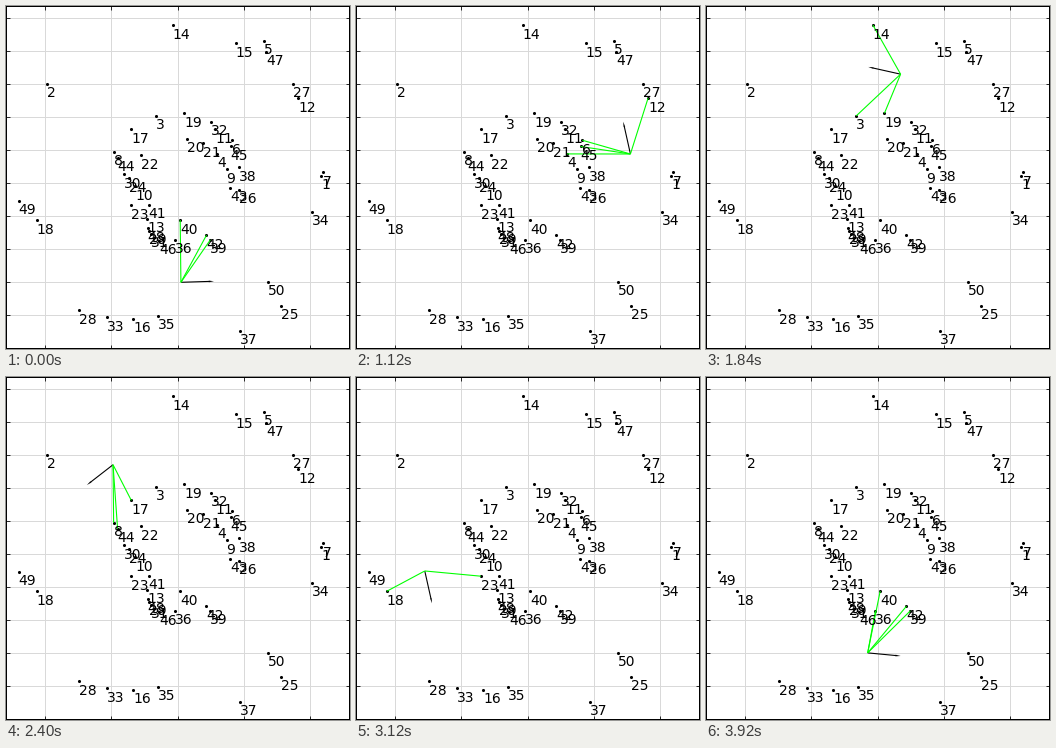
A matplotlib script that plays this animation: 344 by 343 pixels, repeating every 4 s.

```python
import numpy as np
import matplotlib.pyplot as plt
from matplotlib.animation import FuncAnimation
from matplotlib.collections import LineCollection

W, H, DPI = 344, 343, 64
FRAMES = 50
UNIT = 33.1                     # pixels per metre
ORIGIN = np.array([171.6, 177.05])
RADIUS = 10 / np.pi             # one lap is 20 m
SENSOR_RANGE = 2 * UNIT

# Landmarks spread evenly along spirals, inside and outside the driven circle:
# labels, first and last bearing (degrees), first and last distance (metres)
SPIRALS = [
    ("26 38 45 11", -6, 55, 1.87, 1.98),
    ("6 32 19 3 17 8", 38, 154, 2.1, 2.15),
    ("43 9 4 21 20", -5, 78, 1.59, 1.37),
    ("22 24 23 48 36 42", 143, 299, 1.4, 1.8),
    ("44 30 10", 157, 184, 1.97, 1.29),
    ("41 13 31", 217, 242, 1.1, 1.73),
    ("29 40", 239, 274, 1.68, 1.12),
    ("46 39", 252, 300, 1.83, 1.98),
    ("1 12 15", 3, 67.4, 4.34, 4.57),
    ("27 14 2", 40.8, 142.6, 4.6, 4.95),
    ("50 7 47", -47.4, 56, 4.05, 4.78),
    ("28 33 16 35", 232.3, 261.7, 4.85, 4.05),
    ("37 5", -67, 58.8, 4.85, 5.02),
    ("25 34", -50, -12, 4.84, 4.15),
    ("49 18", 186.3, 194.8, 4.83, 4.4),
]


def px(n):
    """Pixels to points."""
    return n * 72 / DPI


def to_stage(x, y):
    """Metres, y up, to stage pixels."""
    return ORIGIN + UNIT * np.column_stack([x, -y])


def spread(labels, bearing0, bearing1, dist0, dist1):
    """Evenly spaced landmarks on one spiral."""
    n = len(labels.split())
    bearing = np.radians(np.linspace(bearing0, bearing1, n))
    dist = np.linspace(dist0, dist1, n)
    return to_stage(dist * np.cos(bearing), dist * np.sin(bearing))


def pose(k):
    """Position in pixels and heading in radians."""
    heading = np.radians(1.8 + 360 / FRAMES * k)
    x = RADIUS * np.sin(heading)
    y = RADIUS * (1 - np.cos(heading)) - 3
    return to_stage(x, y)[0], heading


def visible(pos, heading):
    """Landmarks in range and in the half plane ahead."""
    offset = landmarks - pos
    ahead = offset @ np.array([np.cos(heading), -np.sin(heading)]) > 0
    return landmarks[ahead & (np.hypot(*offset.T) < SENSOR_RANGE)]


landmarks = np.vstack([spread(*spiral) for spiral in SPIRALS])
labels = " ".join(spiral[0] for spiral in SPIRALS).split()

fig = plt.figure(figsize=(W / DPI, H / DPI), dpi=DPI, facecolor="white")
ax = fig.add_axes([0, 0, 1, 1])
ax.set(xlim=(0, W), ylim=(H, 0))
ax.set_xticks(ORIGIN[0] + 2 * UNIT * np.arange(-2, 3))
ax.set_yticks(ORIGIN[1] + UNIT * np.arange(-5, 5))
ax.tick_params(direction="in", length=px(4), width=px(0.8), top=True,
               right=True, labelbottom=False, labelleft=False)
ax.grid(color="0.85", linestyle="-", linewidth=px(1))
ax.set_axisbelow(True)
for spine in ax.spines.values():
    spine.set_linewidth(px(2))

ax.scatter(*landmarks.T, s=px(3.1) ** 2, color="black", linewidths=0, zorder=1)
for label, (x, y) in zip(labels, landmarks):
    ax.text(x, y + 13.5, label, family="DejaVu Sans", fontsize=px(13.89),
            va="baseline", zorder=3)

start, _ = pose(0)
arrow = ax.quiver(*start, UNIT, 0, angles="xy", scale_units="xy", scale=1,
                  units="dots", width=1.1, headwidth=1.6, color="black")
beams = LineCollection([], colors="lime", linewidths=px(1.1), zorder=2)
ax.add_collection(beams, autolim=False)


def draw(k):
    pos, heading = pose(k)
    arrow.set_offsets([pos])
    arrow.set_UVC([UNIT * np.cos(heading)], [-UNIT * np.sin(heading)])
    beams.set_segments([(pos, mark) for mark in visible(pos, heading)])
    return arrow, beams


anim = FuncAnimation(fig, draw, frames=FRAMES, interval=80, repeat=True,
                     repeat_delay=0, blit=False)
plt.show()
```
